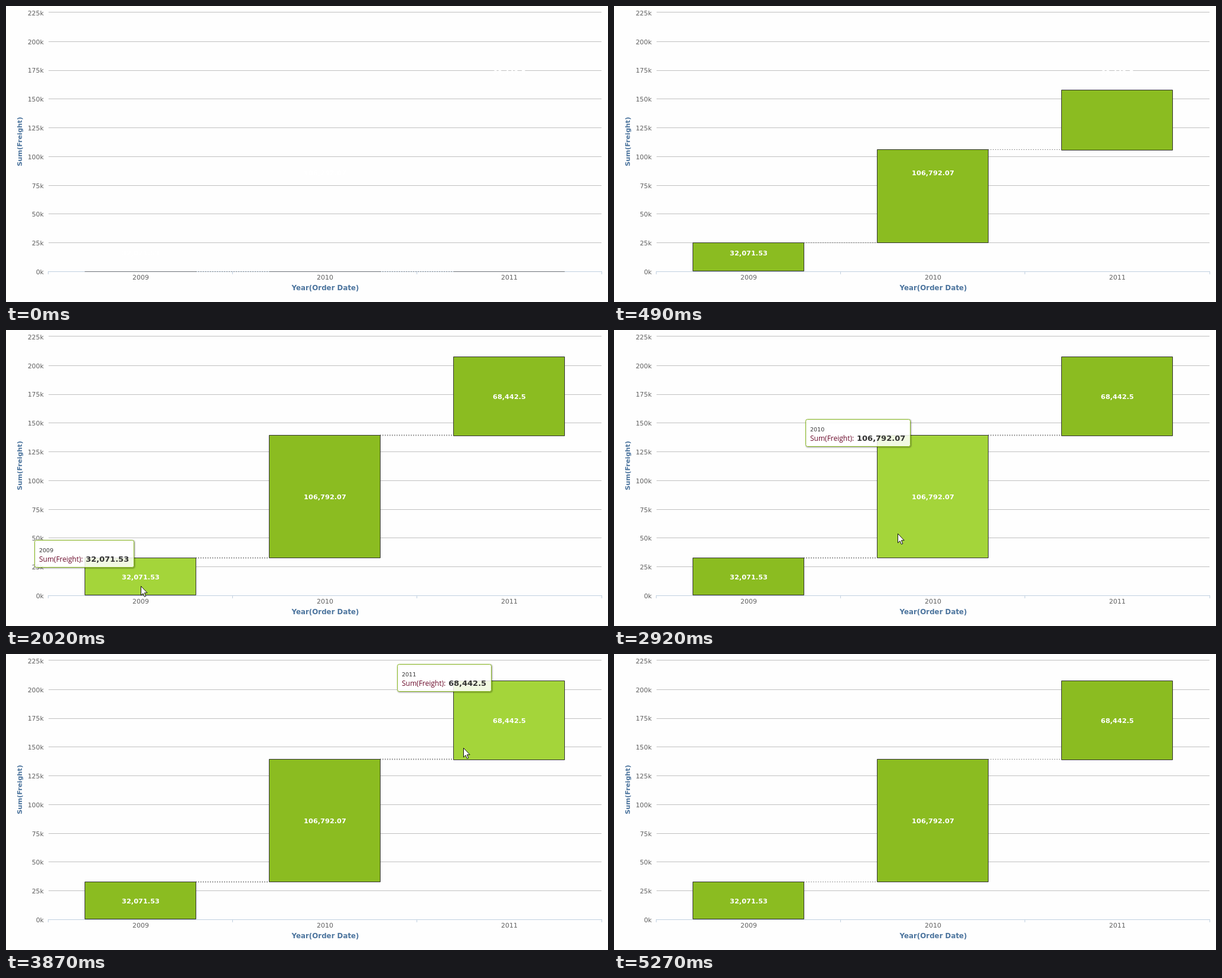
An HTML page for the animation above (5.41 s loop, 1019 by 502 pixels).

```html
<!DOCTYPE html>
<html lang="en">
<head>
<meta charset="utf-8">
<title>Freight by year</title>
<style>
  html, body { margin: 0; width: 100%; height: 100%; overflow: hidden; background: #fefefe; }
  svg { display: block; font-family: "DejaVu Sans", sans-serif; font-size: 11px; }
  .grid { stroke: #c0c0c0; }
  .axis { stroke: #c0d0e0; fill: none; }
  .tick { fill: #606060; }
  .mid { text-anchor: middle; }
  .end { text-anchor: end; }
  .title { fill: #4d759e; font-weight: bold; text-anchor: middle; }
  .bar { stroke: #333; }
  .link { stroke: #333; stroke-dasharray: 1 3; }
  .value { fill: #fff; font-weight: bold; font-size: 11.35px; text-anchor: middle; }
  .shade { fill: none; stroke: #000; }
  .year { font-size: 9.5px; fill: #333; }
  .name { font: 12px "Open Sans", sans-serif; fill: #6b0a2a; }
  .sum { font-size: 13px; font-weight: bold; fill: #333; }
</style>
</head>
<body>
<svg id="stage" width="1019" height="502" viewBox="0 0 1019 502"></svg>
<script>
const LOOP = 5410, BASE = 450, BAR_W = 188, UNITS_PER_PX = 512.6;
const GREEN = '#8bbc21', BRIGHT = '#a4d53a';

// the picture is refreshed in bursts, each starting at one of these times
const bursts = [0, 100, 720, 1690, 2310, 2920, 3510, 4110, 4290, 5140];
const STEP = 78;

// pointer stops: time, x, y; it slows down towards each one
const stops = [
  [1690, 225, 492], [2020, 228, 434], [2240, 228, 434], [2920, 480, 345],
  [3430, 660, 245], [3760, 774, 159], [4050, 774, 159], [4290, 776, 155], [4710, 850, 30]
];

const snap = y => Math.floor(y) + 0.5;

let total = 0;
const bars = [[32071.53, 1890], [106792.07, 2770], [68442.5, 3650]].map(([v, at], i) => {
  total += v;
  const x = 133.5 + 312 * i;
  const top = snap(BASE - 0.5 - total / UNITS_PER_PX);
  const bottom = top + Math.round(v / UNITS_PER_PX);
  return { x, top, bottom, at, mid: x + BAR_W / 2 + 0.5, year: 2009 + i, value: v.toLocaleString('en-US') };
});

const text = (cls, x, y, str, more = '') => `<text class="${cls}" x="${x}" y="${y}" ${more}>${str}</text>`;
const line = (cls, x1, x2, y) => `<path class="${cls}" d="M${x1} ${y}H${x2}"/>`;
const list = (n, fn) => Array.from({ length: n }, (_, i) => fn(i)).join('');

function build() {
  return list(8, i => line('grid', 72, 1008, snap(BASE + 0.4 - 48.75 * (i + 1)))) +
    line('grid', 72, 1008, 10.5) +
    '<path class="axis" d="M71 450.5H1009M71.5 450V455M383.5 450V455M695.5 450V455M1008.5 450V455"/>' +
    list(10, i => text('tick end', 64, Math.round(455 - 48.8 * i), i * 25 + 'k')) +
    list(3, i => text('tick mid', bars[i].mid, 464, bars[i].year)) +
    text('title', 540.5, 482, 'Year(Order Date)', 'font-size="11.85"') +
    text('title', 0, 0, 'Sum(Freight)', 'font-size="11.25" transform="translate(27 230) rotate(-90)"') +
    list(2, () => '<path class="link"/>') +
    list(3, () => '<path class="bar"/>') +
    list(3, i => text('value', bars[i].mid, Math.floor((bars[i].top + bars[i].bottom) / 2 + 5), bars[i].value)) +
    '<g id="tip">' +
    list(3, i => `<rect class="shade frame" x="1.5" y="1.5" height="46" rx="3" stroke-width="${5 - 2 * i}" opacity="${0.05 * (i + 1)}"/>`) +
    `<rect class="frame" x=".5" y=".5" height="46" rx="3" fill="#fff" fill-opacity=".85" stroke="${GREEN}"/>` +
    text('year', 8, 21, '') + text('name', 8, 37, 'Sum(Freight):') + text('sum', 87, 37, '') + '</g>' +
    '<path id="pointer" d="M.5 .5V16L4 12.7L6.4 18.4L8.8 17.4L6.4 11.8H11.2Z" fill="#fff" stroke="#111"/>';
}

const stage = document.getElementById('stage');
stage.innerHTML = build();
const $ = s => stage.querySelector(s);
const all = s => [...stage.querySelectorAll(s)];
const tip = $('#tip'), pointer = $('#pointer'), yearText = $('.year'), sumText = $('.sum');
const shapes = all('.bar'), links = all('.link'), frames = all('.frame');

const set = (el, attrs) => Object.entries(attrs).forEach(([k, v]) => el.setAttribute(k, v));
const show = (el, on) => set(el, { visibility: on ? 'visible' : 'hidden' });
const move = (el, x, y) => set(el, { transform: `translate(${Math.round(x)} ${Math.round(y)})` });
const mix = (a, b, k) => a + (b - a) * k;

// resting place of each bar's tooltip; its width follows the value
for (const b of bars) {
  sumText.textContent = b.value;
  const w = Math.round(96 + sumText.getComputedTextLength());
  b.tip = { w, x: b.mid - 11 - w, y: Math.max(16, b.top - 30.5) };
}

function stepped(time) {
  const from = bursts.findLast(s => s <= time);
  return from + Math.floor((time - from) / STEP) * STEP;
}

function grow(t) {
  if (t < 100) return 0;
  const k = Math.min(1, (t - 80) / 886);
  return 1 - (1 - k) ** 2.3;
}

function pointerAt(t) {
  const i = stops.findIndex(s => s[0] > t);
  if (i < 1) return null;
  const [t0, x0, y0] = stops[i - 1], [t1, x1, y1] = stops[i];
  const k = 1 - (1 - (t - t0) / (t1 - t0)) ** 2;
  return { x: mix(x0, x1, k), y: mix(y0, y1, k) };
}

function drawBars(p, hot) {
  const at = y => snap(BASE - (BASE - y) * p);
  bars.forEach((b, i) => set(shapes[i], {
    d: `M${b.x} ${at(b.top)}h${BAR_W}V${at(b.bottom)}h${-BAR_W}Z`,
    fill: i === hot ? BRIGHT : GREEN,
    opacity: p ? 1 : 0.6
  }));
  links.forEach((l, i) => set(l, {
    d: `M${bars[i].x + BAR_W} ${at(bars[i].top)}H${bars[i + 1].x}`,
    'stroke-width': hot < 0 ? 1 : 2
  }));
}

function drawTip(t, opacity) {
  const i = bars.findLastIndex(b => b.at <= t);
  show(tip, i >= 0 && opacity > 0);
  if (i < 0) return;
  const { tip: to, at, year, value } = bars[i];
  const from = bars[Math.max(0, i - 1)].tip;
  // each small move covers a third of the way across and half of the way up
  const n = Math.round((t - at) / 25);
  move(tip, mix(to.x, from.x, (2 / 3) ** n), mix(to.y, from.y, 0.5 ** n));
  set(tip, { opacity });
  frames.forEach(f => set(f, { width: to.w - 1 }));
  yearText.textContent = year;
  sumText.textContent = value;
}

function draw(time) {
  const t = stepped(time);
  const pos = pointerAt(t);
  show(pointer, pos);
  if (pos) move(pointer, pos.x, pos.y);
  const hot = bars.findIndex(b => pos && pos.x >= b.x && pos.x <= b.x + BAR_W && pos.y >= b.top && pos.y <= b.bottom);
  drawBars(grow(t), hot);
  drawTip(t, time < 5140 ? 1 : Math.max(0, (5270 - time) / 190));
}

const start = performance.now();
function tick() {
  draw((performance.now() - start) % LOOP);
  requestAnimationFrame(tick);
}
tick();
</script>
</body>
</html>
```
